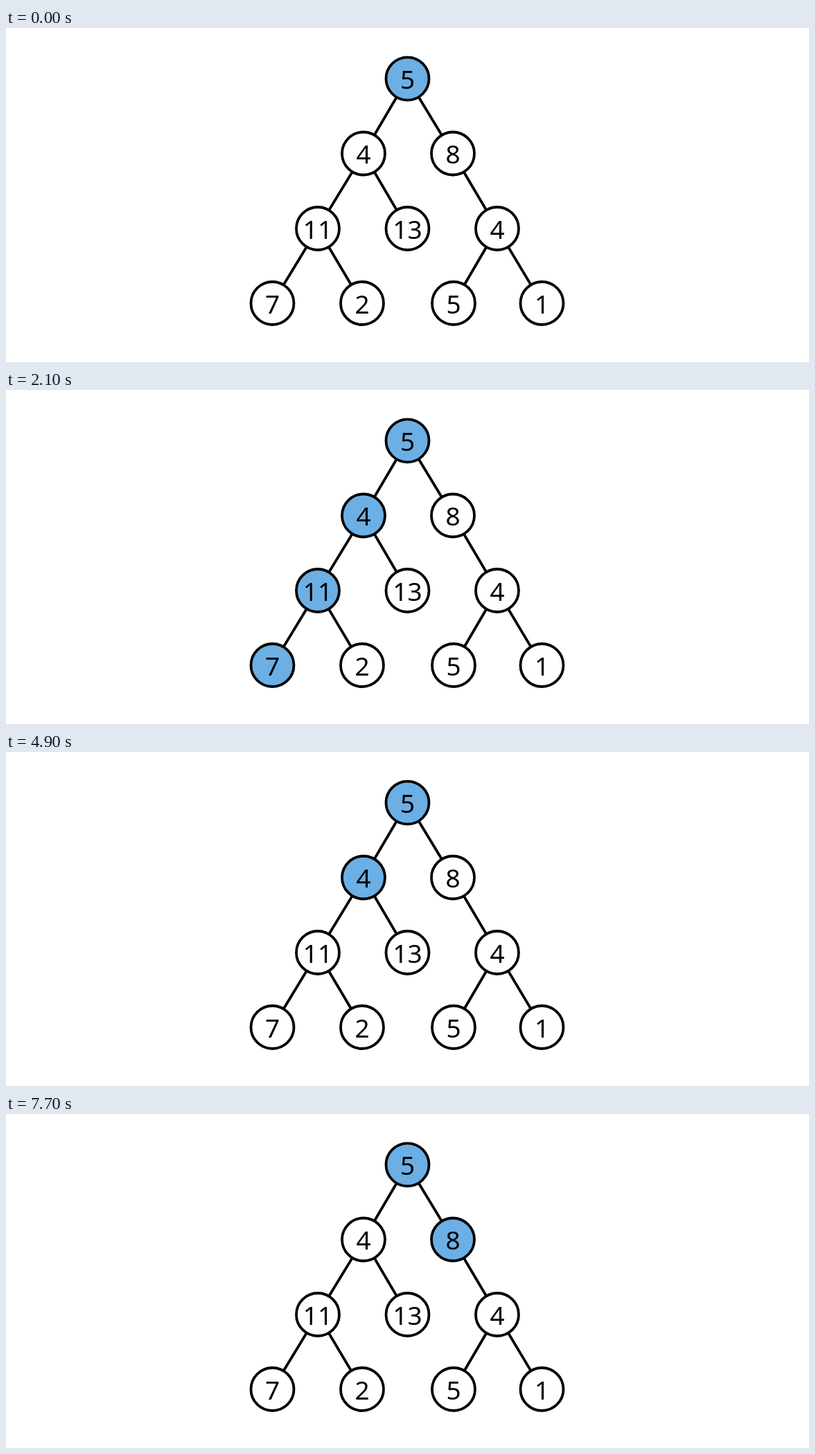
An HTML page that plays this animation: 1159x483 px, repeating every 8 s.

```html
<!DOCTYPE html>
<html lang="en">
<head>
<meta charset="utf-8">
<title>Depth-first walk of a binary tree</title>
<style>
  html, body { margin: 0; width: 100%; height: 100%; overflow: hidden; background: #fff; }
  svg { display: block; width: 100%; height: 100%; }
  line { stroke: #000; stroke-width: 3.8; }
  circle { fill: #fff; stroke: #000; stroke-width: 3.8; }
  circle.visited { fill: #6cafe5; }
  text { font: 37px "Noto Sans", "Open Sans", sans-serif; text-anchor: middle; fill: #000; }
</style>
</head>
<body>
<svg viewBox="0 0 1159 483"></svg>
<script>
  const STEP = 700, LOOP = 8000, RADIUS = 31;

  // label, x, y, parent index
  const nodes = [
    ["5", 579.5, 73.3],
    ["4", 516, 181.5, 0],
    ["8", 645, 181.5, 0],
    ["11", 450, 290, 1],
    ["13", 579.5, 290, 1],
    ["4", 709, 290, 2],
    ["7", 384.5, 398, 3],
    ["2", 514, 398, 3],
    ["5", 646, 398, 5],
    ["1", 773.5, 398, 5],
  ];

  // The deepest node on the current path, one per step
  const walk = [0, 1, 3, 6, 3, 7, 3, 1, 4, 1, 0, 2];

  const svg = document.querySelector("svg");
  function add(tag, attributes, label = "") {
    const element = document.createElementNS(svg.namespaceURI, tag);
    for (const name in attributes) element.setAttribute(name, attributes[name]);
    element.textContent = label;
    return svg.appendChild(element);
  }

  for (const [, x, y, parent] of nodes) {
    if (parent === undefined) continue;
    const [, x1, y1] = nodes[parent];
    add("line", { x1, y1, x2: x, y2: y });
  }
  const circles = nodes.map(([label, cx, cy]) => {
    const circle = add("circle", { cx, cy, r: RADIUS });
    add("text", { x: cx, y: cy + 14.7 }, label);
    return circle;
  });

  function draw(now) {
    const path = new Set();
    let node = walk[Math.floor((now % LOOP) / STEP)];
    while (node !== undefined) {
      path.add(node);
      node = nodes[node][3];
    }
    circles.forEach((circle, i) => circle.classList.toggle("visited", path.has(i)));
  }

  const start = performance.now();
  function tick() {
    draw(performance.now() - start);
    requestAnimationFrame(tick);
  }
  tick();
</script>
</body>
</html>
```
